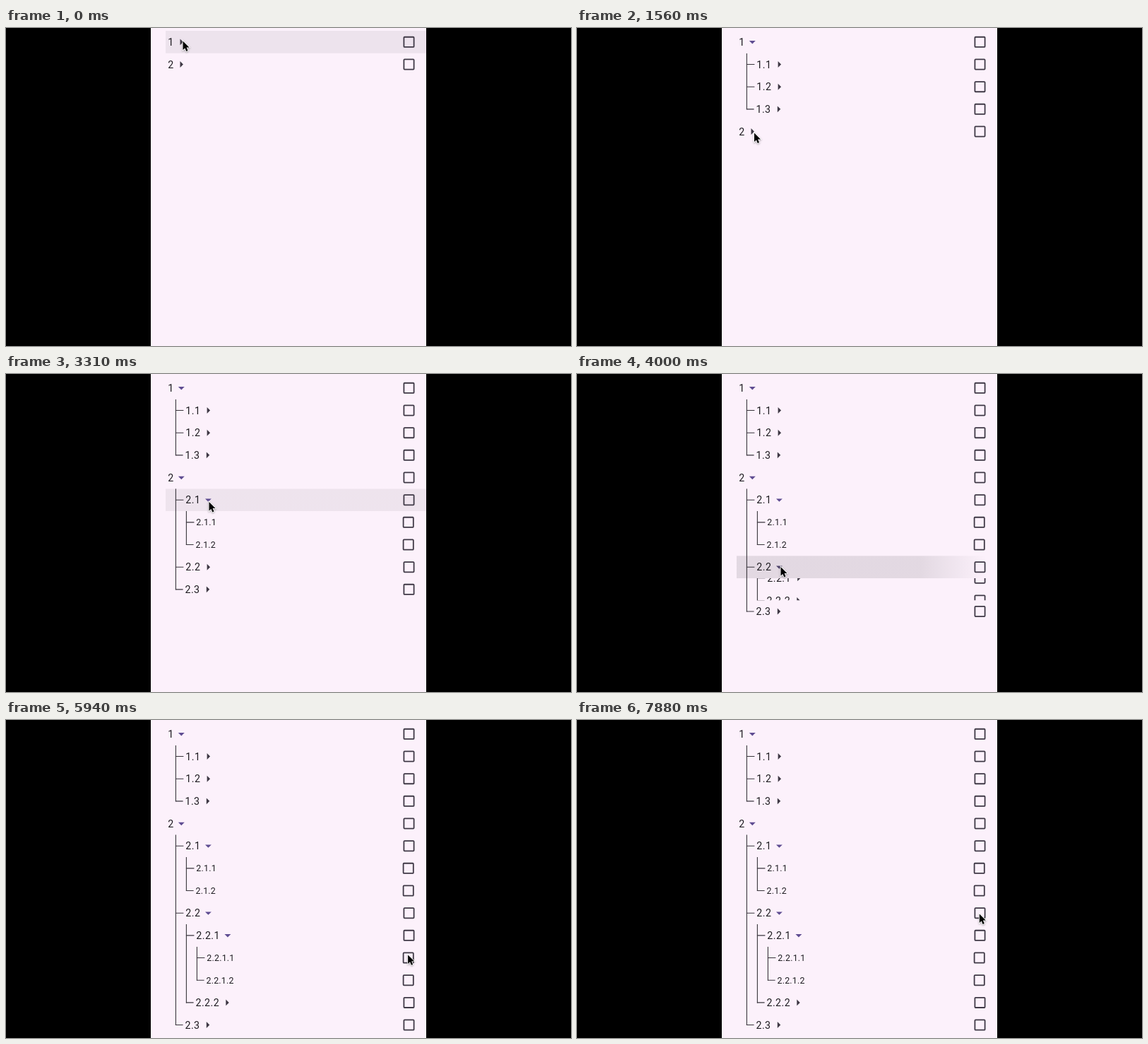
Write an HTML page with a canvas that moves like this. It is 800 px wide and 450 px high and loops after 8000 ms.

```html
<!DOCTYPE html>
<html lang="en">
<head>
<meta charset="utf-8">
<title>Tree view</title>
<style>
  html, body { margin: 0; width: 100%; height: 100%; overflow: hidden; background: #000; }
  canvas { display: block; width: 800px; height: 450px; }
</style>
</head>
<body>
<canvas id="stage" width="800" height="450"></canvas>
<script>
const ctx = document.getElementById('stage').getContext('2d');
const LOOP = 8000, ROW = 31.67, TOP = 4, LEFT = 226, RIGHT = 595;
const INK = '#1d1b20', OUTLINE = '#3f3946', PRIMARY = '#5f4d8a', SURFACE = '#fcf1fb';

const node = (label, children = [], openAt = Infinity, clickX = 0) => ({ label, children, openAt, clickX });
// Collapsed branches that never open in the loop
const closed = label => node(label, [node('')]);

const tree = [
  node('1', [closed('1.1'), closed('1.2'), closed('1.3')], 900, 251),
  node('2', [
    node('2.1', [node('2.1.1'), node('2.1.2')], 2900, 288),
    node('2.2', [
      node('2.2.1', [node('2.2.1.1'), node('2.2.1.2')], 4885, 315),
      closed('2.2.2')
    ], 3897, 288),
    closed('2.3')
  ], 1770, 251)
];

const CHECK = 6120, UNCHECK = 7070;
const PARTIAL = ['2', '2.2', '2.2.1'], CHECKED = '2.2.1.1';

// Each move: start, end, x, y
const moves = [
  [0, 0, 250.5, 18.5],
  [1230, 1500, 251, 148.5],
  [2150, 2420, 287.5, 181],
  [3480, 3700, 288.5, 273],
  [4540, 4690, 315, 307.5],
  [5650, 5950, 569.8, 332.5],
  [7430, 7860, 569.8, 274.5]
];

const clamp = v => Math.max(0, Math.min(1, v));
const ramp = (t, from, to) => clamp((t - from) / (to - from));
const smooth = u => u * u * (3 - 2 * u);
const mix = (a, b, u) => a + (b - a) * u;

// cubic-bezier(.4, 0, .2, 1)
function standardEase(x) {
  let lo = 0, hi = 1;
  for (let i = 0; i < 20; i++) {
    const s = (lo + hi) / 2, r = 1 - s;
    if (1.2 * r * r * s + 0.6 * r * s * s + s ** 3 < x) lo = s; else hi = s;
  }
  return 3 * (1 - lo) * lo * lo + lo ** 3;
}

const openness = (n, t) => t < n.openAt ? 0 : standardEase(ramp(t, n.openAt, n.openAt + 300));

function polyline(points, color, width) {
  ctx.beginPath();
  points.forEach(([x, y]) => ctx.lineTo(x, y));
  ctx.strokeStyle = color;
  ctx.lineWidth = width;
  ctx.stroke();
}

function drawHighlight(n, top, t) {
  if (n.label === '1') {
    ctx.fillStyle = `rgba(29,27,32,${0.062 * (1 - ramp(t, 1230, 1330))})`;
    ctx.fillRect(LEFT, top, RIGHT - LEFT, ROW);
  }
  const age = t - n.openAt + 10;
  if (!(age > 0 && age < 617)) return;
  const alpha = 0.115 * ramp(age, 0, 80) * (1 - ramp(age, 250, 617));
  const radius = 560 * (1 - (1 - clamp(age / 450)) ** 2);
  const cy = top + ROW / 2;
  const glow = ctx.createRadialGradient(n.clickX, cy, radius * 0.8, n.clickX, cy, radius * 1.18);
  glow.addColorStop(0, `rgba(29,27,32,${alpha})`);
  glow.addColorStop(1, 'rgba(29,27,32,0)');
  ctx.fillStyle = glow;
  ctx.fillRect(LEFT, top, RIGHT - LEFT, ROW);
}

function drawArrow(x, y, open) {
  ctx.save();
  ctx.translate(x, y);
  if (open > 0) ctx.rotate(Math.PI / 2);
  ctx.beginPath();
  ctx.moveTo(-1.8, -4.45);
  ctx.lineTo(2.65, 0);
  ctx.lineTo(-1.8, 4.45);
  ctx.fillStyle = `rgb(${mix(62, 95, open)},${mix(56, 77, open)},${mix(68, 146, open)})`;
  ctx.fill();
  ctx.restore();
}

function drawCheckbox(label, x, y, t) {
  const isChecked = label === CHECKED;
  const on = isChecked || PARTIAL.includes(label)
    ? ramp(t, CHECK, CHECK + 180) * (1 - ramp(t, UNCHECK, UNCHECK + 160)) : 0;
  if (isChecked) {
    for (const start of [CHECK, UNCHECK]) {
      const u = ramp(t, start, start + 300);
      if (u > 0 && u < 1) {
        ctx.beginPath();
        ctx.arc(x, y, 17 * smooth(clamp(u * 2)), 0, 7);
        ctx.fillStyle = `rgba(95,77,138,${0.1 * (1 - u)})`;
        ctx.fill();
      }
    }
  }
  ctx.beginPath();
  ctx.roundRect(x - 7.1, y - 7.1, 14.2, 14.2, 1);
  ctx.lineWidth = 1.8;
  ctx.strokeStyle = OUTLINE;
  ctx.stroke();
  if (!on) return;
  ctx.globalAlpha = clamp(on * 2);
  ctx.beginPath();
  ctx.roundRect(x - 8, y - 8, 16, 16, 1.8);
  ctx.fillStyle = PRIMARY;
  ctx.fill();
  const mark = clamp(on * 2 - 1);
  if (mark > 0) {
    polyline(isChecked
      ? [[x - 5.6, y - 0.8], [x - 1.6, y + 3.2], [mix(x - 1.6, x + 5.6, mark), mix(y + 3.2, y - 4, mark)]]
      : [[x - 4.8 * mark, y], [x + 4.8 * mark, y]], '#fff', 1.8);
  }
  ctx.globalAlpha = 1;
}

function drawRow(n, depth, top, isLast, t) {
  const y = top + ROW / 2, isLeaf = !n.children.length;
  const shift = isLast && depth ? -0.8 : 0;
  const textX = 229.3 + (depth ? 10 + 15 * depth : 0) + shift;
  drawHighlight(n, top, t);
  if (depth) {
    const trunkX = 225.4 + 15 * depth;
    polyline([[trunkX - 0.5, y], [trunkX + 11 + shift, y]], '#39353c', 1.1);
  }
  ctx.font = `${isLeaf ? 12.4 : 14.2}px Roboto, sans-serif`;
  ctx.letterSpacing = isLeaf ? '0.22px' : '0.44px';
  ctx.fillStyle = INK;
  ctx.fillText(n.label, textX, y + (isLeaf ? 4.5 : 5.1));
  if (!isLeaf) {
    const arrowX = [248.3, 286.4, 313.9][depth] + shift;
    drawArrow(arrowX, y, openness(n, t));
  }
  drawCheckbox(n.label, 570.5 - (isLeaf ? 0.8 : 0), y, t);
}

const heightOf = (n, t) => {
  const open = openness(n, t);
  return ROW + (open && open * listHeight(n.children, t));
};
const listHeight = (list, t) => list.reduce((sum, n) => sum + heightOf(n, t), 0);

function drawList(list, depth, top, t) {
  const start = top;
  list.forEach((n, i) => {
    const isLast = i === list.length - 1;
    drawRow(n, depth, top, isLast, t);
    if (isLast && depth) {
      const x = 225.4 + 15 * depth;
      polyline([[x, start], [x, top + ROW / 2 + 0.5]], '#39353c', 1.1);
    }
    const height = heightOf(n, t), visible = height - ROW;
    if (visible > 0) {
      // Opening children stay centred in their growing window
      const hidden = listHeight(n.children, t) - visible;
      ctx.save();
      ctx.beginPath();
      ctx.rect(LEFT, top + ROW, RIGHT - LEFT, visible);
      ctx.clip();
      drawList(n.children, depth + 1, top + ROW - hidden / 2, t);
      ctx.restore();
    }
    top += height;
  });
}

function drawCursor(t) {
  let x, y;
  for (const [from, to, nextX, nextY] of moves) {
    if (t < from) break;
    const u = to > from ? smooth(ramp(t, from, to)) : 1;
    x = u === 1 ? nextX : mix(x, nextX, u);
    y = u === 1 ? nextY : mix(y, nextY, u);
  }
  ctx.save();
  ctx.translate(x, y);
  ctx.beginPath();
  [[0, 0], [0, 12.6], [2.9, 9.9], [4.8, 14.4], [7, 13.5], [5.1, 9.1], [9, 8.9]]
    .forEach(([px, py]) => ctx.lineTo(px, py));
  ctx.closePath();
  ctx.shadowColor = 'rgba(0,0,0,.35)';
  ctx.shadowBlur = 2.5;
  ctx.shadowOffsetY = 1;
  ctx.lineWidth = 1.6;
  ctx.strokeStyle = '#fff';
  ctx.stroke();
  ctx.shadowColor = 'transparent';
  ctx.fillStyle = '#000';
  ctx.fill();
  ctx.restore();
}

const began = performance.now();
function frame() {
  const t = (performance.now() - began) % LOOP;
  ctx.fillStyle = '#000';
  ctx.fillRect(0, 0, 800, 450);
  ctx.fillStyle = SURFACE;
  ctx.fillRect(205, 0, 390, 450);
  drawList(tree, 0, TOP, t);
  drawCursor(t);
  requestAnimationFrame(frame);
}
frame();
</script>
</body>
</html>
```
